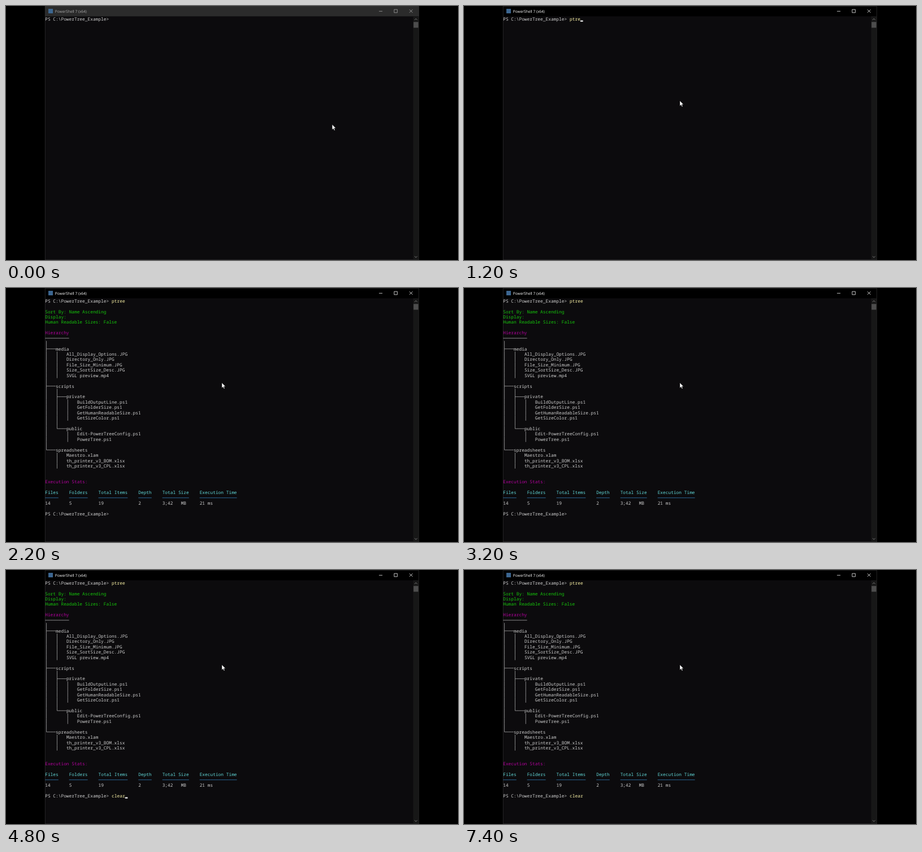
Recreate the animation shown at these times as an HTML page. Size 800x450 px, loop 8000 ms.

```html
<!DOCTYPE html>
<html lang="en">
<head>
<meta charset="utf-8">
<title>Terminal</title>
<style>
  html, body { margin: 0; width: 100%; height: 100%; overflow: hidden; background: #000; }
  svg { display: block; width: 800px; height: 450px; text-rendering: geometricPrecision; }
  text { white-space: pre; }
  .mono { font-family: "Noto Sans Mono", "DejaVu Sans Mono", monospace; font-size: 7.858px; }
  #title { font-family: "Open Sans", "Noto Sans", sans-serif; font-size: 6.6px; }
</style>
</head>
<body>
<svg viewBox="0 0 800 450">
  <rect width="800" height="450"/>
  <rect x="69" y="18" width="662" height="432" fill="#0c0b0d"/>
  <rect id="bar" x="69" width="662" height="18.3"/>
  <path d="M69.3 450V.4H730.6V450M69 449.6H731" fill="none" stroke="#333" stroke-width=".7"/>
  <rect x="75" y="5" width="8" height="8" fill="#3c6690"/>
  <g id="chrome">
    <text id="title" x="86.7" y="11.6"></text>
    <path d="M660.2 9.3h6M687 6.2h5.6v5.6h-5.6zM714 6.2l5.6 5.6m0-5.6l-5.6 5.6"
      fill="none" stroke="currentColor" stroke-width=".75"/>
  </g>
  <rect x="720.6" y="18.3" width="9.8" height="431" fill="#171717"/>
  <rect x="721.3" y="28.3" width="8.4" height="10.2" fill="#4d4d4d"/>
  <path d="M723.2 24.7l2.3-2.3 2.3 2.3M723.2 443.4l2.3 2.3 2.3-2.3" fill="none" stroke="#888" stroke-width=".9"/>
  <g id="first" class="mono"></g>
  <g id="output" class="mono"></g>
  <rect id="selection" fill="#f2f2f2"/>
  <rect id="caret" fill="#f2f2f2"/>
  <path id="mouse" d="M0 0V9.4L2.2 7.4 3.7 10.8 5.2 10.1 3.7 6.8H6.6Z" fill="#fff" stroke="#000" stroke-width=".5"/>
</svg>
<script>
const LOOP = 8000;
const LEFT = 69.2, TOP = 18.3, CELL_W = 4.715, CELL_H = 9.425;
const GRAY = '#ccc', GREEN = '#16c60c', MAGENTA = '#b4009e', CYAN = '#61d6d6', BLUE = '#3a96dd', YELLOW = '#f9f1a5';
const PROMPT = 'PS C:\\PowerTree_Example>', COMMAND_COL = 25, LAST_ROW = 40;

const $ = id => document.getElementById(id);
const colX = col => LEFT + col * CELL_W;
const rowY = row => TOP + row * CELL_H;

function add(parent, tag, attrs, text = '') {
  const el = document.createElementNS('http://www.w3.org/2000/svg', tag);
  for (const name in attrs) el.setAttribute(name, attrs[name]);
  el.textContent = text;
  return parent.appendChild(el);
}

const print = (parent, row, col, text, fill = GRAY) =>
  add(parent, 'text', { x: colX(col), y: rowY(row) + 7.45, fill }, text);

// Box-drawing characters become strokes; everything else is text on the cell grid.
function printLine(parent, row, line, color) {
  for (const m of line.matchAll(/[^│├└─ ]+( [^│├└─ ]+)*/g)) print(parent, row, m.index, m[0], color);
  const midY = rowY(row) + CELL_H / 2;
  let d = '';
  [...line].forEach((ch, col) => {
    const x = colX(col), midX = x + CELL_W / 2;
    if (ch === '─') d += `M${x} ${midY}h${CELL_W}`;
    if ('├└'.includes(ch)) d += `M${midX} ${midY}h${CELL_W / 2}`;
    if ('│├└'.includes(ch)) d += `M${midX} ${rowY(row)}v${ch === '└' ? CELL_H / 2 : CELL_H}`;
  });
  if (d) add(parent, 'path', { d, stroke: color, 'stroke-width': 0.65, fill: 'none' });
}

const tree = `│
├───media
│   │   All_Display_Options.JPG
│   │   Directory_Only.JPG
│   │   File_Size_Minimum.JPG
│   │   Size_SortSize_Desc.JPG
│   │   SVGL preview.mp4
│
├───scripts
│   │
│   ├───private
│   │   │   BuildOutputLine.ps1
│   │   │   GetFolderSize.ps1
│   │   │   GetHumanReadableSize.ps1
│   │   │   GetSizeColor.ps1
│   │
│   └───public
│       │   Edit-PowerTreeConfig.ps1
│       │   PowerTree.ps1
│
└───spreadsheets
    │   Maestro.xlam
    │   th_printer_v3_BOM.xlsx
    │   th_printer_v3_CPL.xlsx`;

const header = 'Files    Folders    Total Items    Depth    Total Size    Execution Time';
const blocks = [
  [2, GREEN, 'Sort By: Name Ascending\nDisplay:\nHuman Readable Sizes: False'],
  [6, MAGENTA, 'Hierarchy'],
  [7, GRAY, '─'.repeat(9)],
  [8, GRAY, tree],
  [34, MAGENTA, 'Execution Stats:'],
  [36, CYAN, header],
  [37, BLUE, header.replace(/\S+( \S+)*/g, s => '─'.repeat(s.length))],
  [38, GRAY, '14       5          19             2        3;42   MB     21 ms'],
  [LAST_ROW, GRAY, PROMPT]
];
for (const [row, color, text] of blocks)
  text.split('\n').forEach((line, i) => printLine($('output'), row + i, line, color));

print($('first'), 0, 0, PROMPT);
const commands = [
  { row: 0, text: 'ptree', el: print($('first'), 0, COMMAND_COL, '', YELLOW),
    steps: [[800, 1], [1000, 2], [1200, 4], [1400, 5]] },
  { row: LAST_ROW, text: 'clear', el: print($('output'), LAST_ROW, COMMAND_COL, '', YELLOW),
    steps: [[4000, 1], [4200, 3], [4400, 5]] }
];
const caretToggles = [600, 2200, 2800, 3200, 3800, 4400, 4800, 5200, 5800, 6400, 7000, 7400];

function place(el, row, col, height) {
  const attrs = { x: colX(col), y: rowY(row + 1) - height, width: CELL_W, height };
  for (const name in attrs) el.setAttribute(name, attrs[name]);
}
place($('selection'), 15, 66, CELL_H);

const show = (el, visible) => el.setAttribute('visibility', visible ? 'visible' : 'hidden');

function render(t) {
  const active = t >= 200, selecting = active && t < 600, listed = t >= 1400;
  const chromeColor = active ? '#fff' : '#aaa';
  $('bar').setAttribute('fill', active ? '#000' : '#2b2b2b');
  $('chrome').setAttribute('fill', chromeColor);
  $('chrome').setAttribute('color', chromeColor);
  $('title').textContent = (selecting ? 'Select ' : '') + 'PowerShell 7 (x64)';
  $('mouse').setAttribute('transform', active ? 'translate(382 167.8)' : 'translate(577.2 209.8)');
  show($('selection'), selecting);
  show($('output'), listed);

  for (const { el, text, steps } of commands) {
    const typed = steps.filter(([at]) => t >= at).pop()?.[1] ?? 0;
    el.textContent = text.slice(0, typed);
  }
  const current = commands[listed ? 1 : 0];
  place($('caret'), current.row, COMMAND_COL + current.el.textContent.length, 2.2);
  show($('caret'), caretToggles.filter(at => t >= at).length % 2);
}

function frame() {
  render(performance.now() % LOOP);
  requestAnimationFrame(frame);
}
frame();
</script>
</body>
</html>
```
